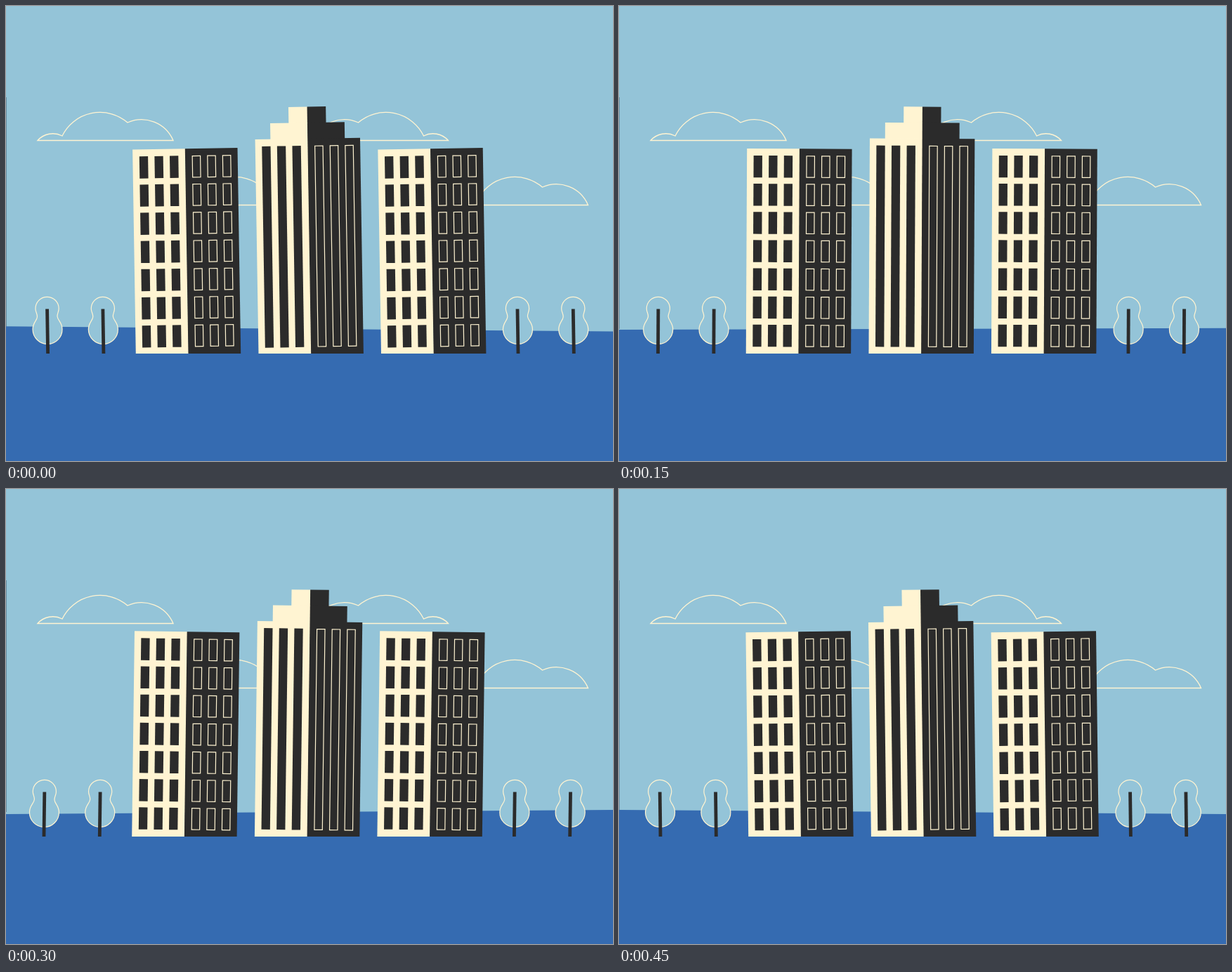
Animation, 864 px wide and 648 px high, one loop 500 ms. Source, as an HTML page with a canvas:

```html
<!DOCTYPE html>
<html lang="en">
<head>
<meta charset="utf-8">
<title>Swaying city</title>
<style>
html, body { margin: 0; width: 100%; height: 100%; overflow: hidden; background: #94c4d8; }
canvas { display: block; }
</style>
</head>
<body>
<canvas id="stage" width="864" height="648"></canvas>
<script>
const ctx = document.getElementById('stage').getContext('2d');
const WIDTH = 864, HEIGHT = 648;
const SKY = '#94c4d8', GROUND = '#356bb1', CREAM = '#fff4d2', DARK = '#2b2b2b';
const LOOP = 500, STEP = 50;
const BASE_Y = 495, PIVOT_Y = 302, HORIZON_Y = 459.9;
const SWAY = 0.92 * Math.PI / 180;
const HORIZON_RISE = 3.7;

const cloud = new Path2D(
  'M45 191.5A29 29 0 0 1 80 185A60 60 0 0 1 173 166A49 49 0 0 1 238 191.5Z');
const crown = new Path2D(
  'M0 414.3C9.3 414.3 16.6 421.7 16.6 431C16.6 436 14 438 14.3 442.5' +
  'C14.8 448 21 451 21 460.5C21 472 11.6 481.5 0 481.5' +
  'C-11.6 481.5 -21 472 -21 460.5C-21 451 -14.8 448 -14.3 442.5' +
  'C-14 438 -16.6 436 -16.6 431C-16.6 421.7 -9.3 414.3 0 414.3Z');

function rect(color, x, y, w, h) {
  ctx.fillStyle = color;
  ctx.fillRect(x, y, w, h);
}

function drawCloud(x, y, flip = 1) {
  ctx.save();
  ctx.translate(x, y);
  ctx.scale(flip, 1);
  ctx.strokeStyle = CREAM;
  ctx.lineWidth = 1.3;
  ctx.stroke(cloud);
  ctx.restore();
}

// Runs a drawing with x measured from the object's own centre line.
function swaying(x, angle, draw) {
  ctx.save();
  ctx.translate(x, PIVOT_Y);
  ctx.rotate(angle);
  ctx.translate(0, -PIVOT_Y);
  draw();
  ctx.restore();
}

function drawBlock(halfWidth, top) {
  rect(CREAM, -halfWidth, top, halfWidth + 0.5, 510 - top);
  rect(DARK, 0, top, halfWidth, 510 - top);
}

function drawWindows(top, height) {
  ctx.strokeStyle = CREAM;
  ctx.lineWidth = 1.2;
  for (let i = 0; i < 3; i++) {
    const x = 9.7 + 21.6 * i;
    rect(DARK, -x - 12.3, top, 12.3, height);
    ctx.strokeRect(x + 0.5, top + 0.5, 11.4, height - 1);
  }
}

function drawApartments() {
  drawBlock(74.7, 203.3);
  for (let row = 0; row < 7; row++) drawWindows(213.2 + 40.15 * row, 31.4);
}

function drawTower() {
  drawBlock(26.6, 143.5);
  drawBlock(52.9, 166.2);
  drawBlock(74.7, 188.9);
  drawWindows(198.9, 286.8);
}

function drawTree() {
  ctx.fillStyle = SKY;
  ctx.fill(crown);
  ctx.strokeStyle = CREAM;
  ctx.lineWidth = 1.2;
  ctx.stroke(crown);
  rect(DARK, -2.4, 431.5, 4.8, 70);
}

function drawScene(time) {
  const step = Math.floor((time % LOOP) / STEP);
  const wave = Math.cos(2 * Math.PI * step * STEP / LOOP);
  const angle = -SWAY * wave;

  rect(SKY, 0, 0, WIDTH, HEIGHT);
  rect('rgba(43, 60, 80, 0.4)', 0, 130, 1, 330);
  drawCloud(0, 0);
  drawCloud(674.5, 0, -1);
  drawCloud(192, 92);
  drawCloud(590.5, 92);

  ctx.fillStyle = GROUND;
  ctx.beginPath();
  ctx.moveTo(0, HORIZON_Y - HORIZON_RISE * wave);
  ctx.lineTo(WIDTH, HORIZON_Y + HORIZON_RISE * wave);
  ctx.lineTo(WIDTH, HEIGHT);
  ctx.lineTo(0, HEIGHT);
  ctx.fill();

  for (const x of [56.5, 135.8, 725.9, 805.2]) swaying(x, angle, drawTree);
  swaying(256.4, angle, drawApartments);
  swaying(431.1, angle, drawTower);
  swaying(605.6, angle, drawApartments);

  rect(GROUND, 0, BASE_Y, WIDTH, HEIGHT - BASE_Y);
}

function tick() {
  drawScene(performance.now());
  requestAnimationFrame(tick);
}
tick();
</script>
</body>
</html>
```
